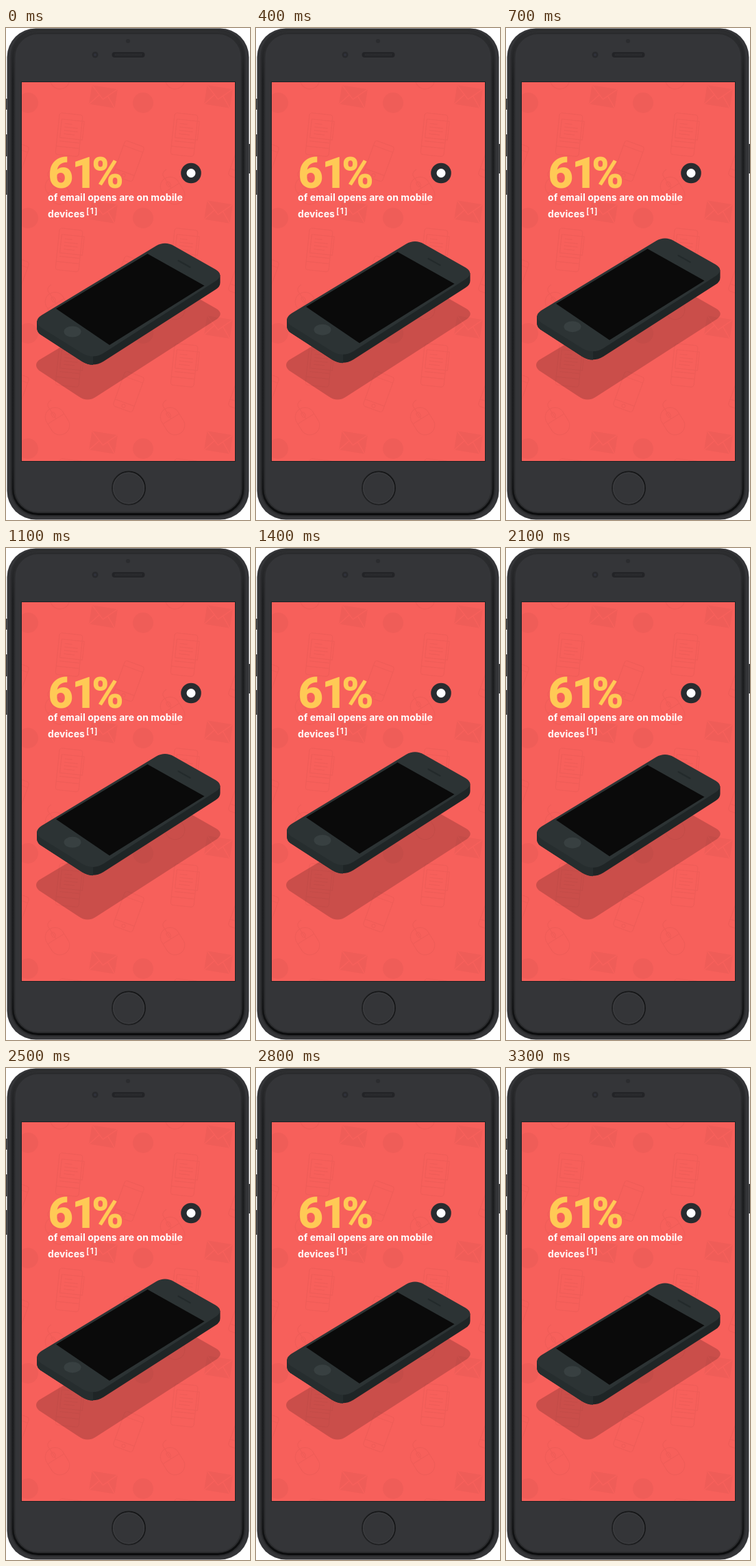
Animation, 356 px wide and 717 px high, one loop 3400 ms. Source, as an HTML page:

```html
<!DOCTYPE html>
<html lang="en">
<head>
<meta charset="utf-8">
<title>Mobile email opens</title>
<style>
  html, body { margin: 0; width: 100%; height: 100%; overflow: hidden; background: #fff; }
  svg { display: block; width: 356px; height: 717px; }
  .big { font: 900 63px Roboto, Inter, sans-serif; fill: #ffca55; }
  .copy { font: 700 14px Inter, "Open Sans", sans-serif; letter-spacing: .06px; fill: #fff; }
  .note { font: 600 12px Inter, "Open Sans", sans-serif; letter-spacing: 1.2px; fill: #fff; }
  .line { fill: none; stroke: #000; stroke-width: 1.2; stroke-linejoin: round; }
  .cut { fill: none; stroke: #f7605b; stroke-width: 1.5; }
</style>
</head>
<body>
<svg viewBox="0 0 356 717">
  <defs>
    <clipPath id="screen"><rect x="23" y="79" width="311" height="552"/></clipPath>
    <linearGradient id="bevel" x2="0" y2="1">
      <stop stop-color="#2d2e30"/><stop offset=".1" stop-color="#1d1e20"/>
      <stop offset=".9" stop-color="#1b1c1e"/><stop offset="1" stop-color="#0b0c0d"/>
    </linearGradient>
    <linearGradient id="ring" x1="0" y1="1" x2="1" y2="0">
      <stop stop-color="#232426"/><stop offset="1" stop-color="#131415"/>
    </linearGradient>
    <g id="icons">
      <g transform="translate(142 100) rotate(9)">
        <path d="M-19-14H19V14H-19z"/>
        <path class="cut" d="M-19-14 0 4 19-14M-19 14-6-2M19 14 6-2"/>
      </g>
      <circle cx="200" cy="109" r="15"/>
      <g transform="translate(92 156) rotate(6)">
        <rect class="line" x="-17" y="-31" width="34" height="61" rx="4"/>
        <path class="line" d="M-13-22H20V5H-13zM-17 18H17M-8-16H3M-8-11H12M-8-6H12M-8-1H8M-13 10H16"/>
      </g>
      <g transform="translate(179 194) rotate(20)">
        <rect class="line" x="-15" y="-27" width="30" height="54" rx="4"/>
        <path class="line" d="M-15-19H15M-15 17H15"/>
        <circle class="line" cy="22" r="2.5"/>
      </g>
      <g transform="translate(75 237) rotate(-32)">
        <rect class="line" x="-14" y="-21" width="28" height="42" rx="14"/>
        <path class="line" d="M-14-4H14M0-21V-4M0-21Q-2-31 9-31"/>
        <rect class="line" x="-2.5" y="-15" width="5" height="8" rx="2.5"/>
      </g>
    </g>
  </defs>

  <!-- Handset frame -->
  <path d="M.5 103V119M.5 155V187M.5 207V243M355.3 169V212" stroke="#2b2c2e" stroke-width="2"/>
  <rect x="1.5" y=".5" width="353" height="716" rx="42" fill="#343538"/>
  <rect x="10" y="5.500" width="336" height="703" rx="37" fill="#343538" stroke="#2a2b2d" stroke-width="7"/>
  <rect x="10" y="5.500" width="336" height="703" rx="37" fill="none" stroke="url(#bevel)" stroke-width="3"/>
  <circle cx="178" cy="19" r="3" fill="#2b2c2f"/>
  <circle cx="130" cy="39" r="4.500" fill="#28292c"/>
  <circle cx="130" cy="39" r="2" fill="#30323b"/>
  <rect x="154.500" y="35" width="48" height="8" rx="4" fill="#232427"/>
  <path d="M159 39H198" stroke="#303134" stroke-width="3" stroke-dasharray="1 1"/>
  <circle cx="179" cy="670.500" r="24" fill="#343538" stroke="url(#ring)" stroke-width="2"/>
  <circle cx="179" cy="670.500" r="22.500" fill="none" stroke="#3f4043"/>

  <!-- Screen -->
  <rect x="22.500" y="78.500" width="312" height="553" fill="#f7605b" stroke="#202123"/>
  <g clip-path="url(#screen)"><g id="pattern" opacity=".035"></g></g>

  <text class="big" x="61.5 96 125" y="232.500">61%</text>
  <text class="copy" x="61" y="252">of email opens are on mobile</text>
  <text class="copy" x="61" y="275.500">devices</text>
  <text class="note" x="117" y="270.500">[1]</text>
  <circle cx="270" cy="211.500" r="14.800" fill="#292c2f"/>
  <circle cx="270" cy="211.500" r="6.500" fill="#fff"/>

  <!-- Floating phone and its shadow -->
  <path opacity=".18" d="M48 484 229 376Q239 370 249 376L307 409Q318 416 308 424L132 537Q119 546 106 537L48 499Q40 491 48 484z"/>
  <g id="phone">
    <path fill="#1f2526" d="M45 427V436Q45 443 50 446.500L111 486Q127 495 142 486L306 381Q312.500 377 312.500 371V360z"/>
    <path fill="#262d2e" d="M45 427V436Q45 443 50 446.500L111 486Q119 491 127 491V477z"/>
    <path fill="#2c3334" d="M52 418.500 219 317.500Q232 310 245 317.500L306 352Q318 359.500 307 368L142 474Q127 483 112 474.500L51 436.500Q39 427 52 418.500z"/>
    <path fill="#0a0a0a" d="M73 409 206.500 329 289.500 375.500 151 462z"/>
    <ellipse cx="97" cy="442.500" rx="12.500" ry="8" fill="#384041"/>
    <path d="M251.500 339 268.500 348.500" stroke="#232a2b" stroke-width="2.200" stroke-linecap="round"/>
  </g>
</svg>
<script>
  const LOOP = 3400, BOB = 3200, LIFT = 17, STEP = 100;
  const phone = document.getElementById("phone");

  let tiles = "";
  for (let y = -168; y <= 504; y += 168)
    for (let x = -168; x <= 168; x += 168)
      tiles += `<use href="#icons" x="${x}" y="${y}"/>`;
  document.getElementById("pattern").innerHTML = tiles;

  const start = performance.now();
  function draw() {
    const t = Math.floor((performance.now() - start) % LOOP / STEP) * STEP;
    const lift = LIFT * (1 - Math.cos(2 * Math.PI * (t + 30) / BOB)) / 2;
    phone.setAttribute("transform", `translate(0 ${-lift.toFixed(2)})`);
    requestAnimationFrame(draw);
  }
  draw();
</script>
</body>
</html>
```
